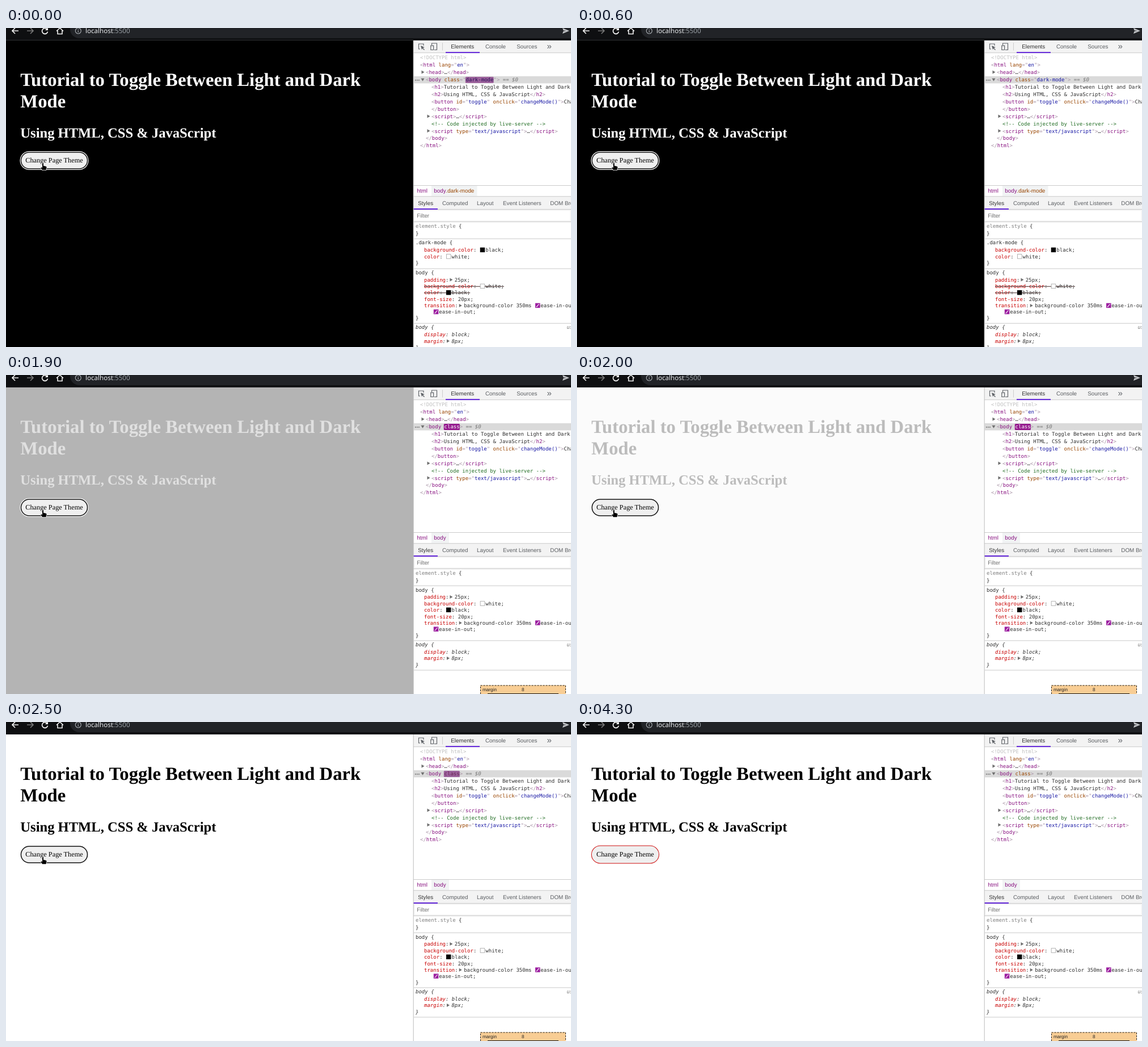
These frames come from a looping animation (996 by 562 pixels, 4400 ms). An HTML page with a canvas:

```html
<!DOCTYPE html>
<html lang="en">
<head>
<meta charset="utf-8">
<title>Theme toggle</title>
<style>
html, body { margin: 0; width: 100%; height: 100%; overflow: hidden; background: #fff; }
canvas { display: block; }
</style>
</head>
<body>
<canvas id="stage" width="996" height="562"></canvas>
<script>
const ctx = document.getElementById('stage').getContext('2d');
ctx.textRendering = 'geometricPrecision';
const LOOP = 4400, STEP = 100;
const SERIF = '"Liberation Serif", serif';
const SANS = '9.84px "Liberation Sans", sans-serif';
const MONO = '9.02px "DejaVu Sans Mono", monospace';
const CH = 9.02 * 0.602;
const TAG = '#881280', PUNCT = '#a894a6', ATTR = '#994500', VALUE = '#1a1aa6';
const INK = '#303030', PROP = '#c80000', ACCENT = '#5310d6', LINE = '#cacaca';

const clamp = v => Math.max(0, Math.min(1, v));
const mix = (a, b, k) => a.map((v, i) => Math.round(v + (b[i] - v) * k));
const rgb = c => `rgb(${c.join(',')})`;

// CSS ease-in-out: cubic-bezier(.42, 0, .58, 1)
function easeInOut(x) {
  x = clamp(x);
  let lo = 0, hi = 1, s = x;
  for (let i = 0; i < 24; i++) {
    s = (lo + hi) / 2;
    const bx = 3 * s * (1 - s) * (1 - s) * 0.42 + 3 * s * s * (1 - s) * 0.58 + s ** 3;
    if (bx < x) lo = s; else hi = s;
  }
  return 3 * s * s - 2 * s ** 3;
}

function rect(x, y, w, h, color) {
  ctx.fillStyle = color;
  ctx.fillRect(x, y, w, h);
}

function text(str, x, y, color, font = SANS) {
  ctx.font = font;
  ctx.fillStyle = color;
  ctx.fillText(str, x, y);
}

function pill(x, y, w, h, fill, r = h / 2) {
  ctx.beginPath();
  ctx.roundRect(x, y, w, h, r);
  ctx.fillStyle = fill;
  ctx.fill();
}

function path(d, color, width) {
  const p = new Path2D(d);
  if (width) {
    ctx.lineWidth = width;
    ctx.strokeStyle = color;
    ctx.stroke(p);
  } else {
    ctx.fillStyle = color;
    ctx.fill(p);
  }
}

const right = (x, y) => path(`M${x} ${y - 3}l5 3l-5 3z`, '#6e6e6e');
const down = (x, y) => path(`M${x} ${y - 2.5}h6l-3 5z`, '#6e6e6e');

// ---- browser bar ----
function toolbar() {
  rect(0, 0, 996, 22, '#0e0f11');
  rect(0, 21, 996, 1, '#2e2f32');
  pill(113, -14, 900, 32, '#212327');
  path('M22 5H11M16 0L11 5L16 10', '#f1f1f1', 1.7);
  path('M37 5H48M43 0L48 5L43 10', '#777', 1.7);
  path('M72.5 2.2A5 5 0 1 0 73.5 6.5', '#f1f1f1', 1.7);
  path('M74 -1V4H69z', '#f1f1f1');
  path('M89 5.5L95 0L101 5.5M91 4.5V10.5H99V4.5', '#f1f1f1', 1.6);
  path('M132.3 5a5 5 0 1 1 -10 0a5 5 0 1 1 10 0M127.3 4.4V7.8M127.3 2.2V3.4', '#a4a8ad', 1.2);
  const font = '11.6px "Noto Sans", sans-serif';
  text('localhost', 140, 9.3, '#e8eaed', font);
  text(':5500', 140 + ctx.measureText('localhost').width, 9.3, '#9aa0a6', font);
  path('M981 0L993 5L981 10L982.5 5.8L988 5L982.5 4.2z', '#c3c5c8');
}

// ---- page ----
function page(t) {
  const on = t >= 1800;
  const bg = on ? easeInOut((t - 1682) / 350) : 0;
  const fg = on ? easeInOut((t - 1680) / 900) : 0;
  const ink = t >= 2500 ? '#000' : rgb(mix([255, 255, 255], [0, 0, 0], fg));
  rect(0, 22, 718, 540, rgb(mix([0, 0, 0], [255, 255, 255], bg)));
  const h1 = 'bold 32.7px ' + SERIF;
  text('Tutorial to Toggle Between Light and Dark', 25.3, 102, ink, h1);
  text('Mode', 25.3, 140, ink, h1);
  text('Using HTML, CSS & JavaScript', 25.3, 192.7, ink, 'bold 24.6px ' + SERIF);
  button(t >= 4300);
}

function button(blurred) {
  if (blurred) {
    pill(25, 217.5, 120, 32, '#cf1111');
    pill(26, 218.5, 118, 30, '#efefef');
  } else {
    pill(24.5, 217, 121, 33, '#fff');
    pill(25.7, 218.2, 118.6, 30.6, '#101010');
    pill(27.2, 219.7, 115.6, 27.6, '#efefef');
  }
  text('Change Page Theme', 34.2, 237.3, '#000', '12.3px ' + SERIF);
}

// ---- elements panel ----
function markup(str, x, y) {
  let inTag = false, quoted = false, named = false;
  for (const c of str) {
    let color = INK;
    if (c === '<') { inTag = true; named = false; color = PUNCT; }
    else if (c === '>') { inTag = false; color = PUNCT; }
    else if (c === '"' && inTag) { quoted = !quoted; color = PUNCT; }
    else if (quoted) color = VALUE;
    else if (inTag) {
      if (c === ' ') named = true;
      color = c === '/' || c === '=' ? PUNCT : named ? ATTR : TAG;
    }
    text(c, x, y, color, MONO);
    x += CH;
  }
  return x;
}

// Flash on the changed attribute: colour shift and opacity.
function flash(t) {
  if (t < 600) return { k: 1, a: t < 300 ? 1 : clamp((600 - t) / 400) };
  if (t < 1800) return { k: 1, a: 0 };
  return { k: clamp((t - 2000) / 500), a: t < 3000 ? 1 : clamp((3300 - t) / 400) };
}

function bodyRow(y, dark, t) {
  rect(719, 85, 277, 12.5, '#dadada');
  for (let i = 0; i < 3; i++) rect(721 + i * 3, 91, 1.7, 1.7, '#6e6e6e');
  down(731.5, 91.3);
  const end = markup(dark ? '<body class="dark-mode">' : '<body class>', 740, y);
  text(' == $0', end, y, '#777', 'italic ' + MONO);
  const { k, a } = flash(t);
  if (!a) return;
  const word = dark ? 'dark-mode' : 'class';
  const x = 740 + CH * (dark ? 13 : 6);
  ctx.globalAlpha = a;
  pill(x - 0.8, 86, word.length * CH + 1, 11, rgb(mix([149, 26, 142], [156, 98, 156], k)), 1.5);
  ctx.globalAlpha = 1;
  const mid = dark ? [44, 17, 88] : [104, 40, 84];
  const base = dark ? [26, 26, 166] : [153, 69, 0];
  text(word, x, y, rgb(mix(mix([255, 255, 255], mid, k), base, 1 - a)), MONO);
}

function tree(dark, t) {
  const row = i => 55 + i * 12.95;
  text('<!DOCTYPE html>', 730, row(0), '#c0c0c0', MONO);
  bodyRow(row(3), dark, t);
  const rows = [
    [1, 730, '<html lang="en">'],
    [2, 740, '<head>…</head>'],
    [4, 750, '<h1>Tutorial to Toggle Between Light and Dark Mode</h1>'],
    [5, 750, '<h2>Using HTML, CSS & JavaScript</h2>'],
    [6, 750, '<button id="toggle" onclick="changeMode()">Change'],
    [7, 750, '</button>'],
    [8, 750, '<script>…<\/script>'],
    [10, 750, '<script type="text/javascript">…<\/script>'],
    [11, 740, '</body>'],
    [12, 730, '</html>']
  ];
  for (const [i, x, str] of rows) {
    markup(str, x, row(i));
    if (str.includes('…')) right(x - 7.5, row(i) - 3.2);
  }
  text('<!-- Code injected by live-server -->', 750, row(9), '#236e25', MONO);
}

function tabs(list, y) {
  list.forEach(([name, x], i) => text(name, x, y, i ? '#5a5d61' : '#333', SANS));
}

function chrome(dark) {
  rect(718, 22, 278, 540, '#fff');
  rect(718, 22, 278, 21.5, '#f3f3f3');
  rect(718, 43.2, 278, 1, LINE);
  path('M736 31V28H727.5V37H730', '#5f6368', 1.2);
  path('M731 31L738 34L735 35L738 38L737 39L734 36L733 38.5z', '#5f6368');
  path('M750.5 30V27H759.5V38.5H755M748.8 31.2H753.6V38.5H748.8z', '#5f6368', 1.2);
  rect(769, 26, 1, 13.5, '#ccc');
  tabs([['Elements', 784.3], ['Console', 845], ['Sources', 900.3]], 36.3);
  text('»', 953.5, 37, '#5f6368', '15px "Liberation Sans", sans-serif');
  rect(775, 42.3, 60, 1.8, ACCENT);

  rect(718, 277, 278, 1, LINE);
  text('html', 724.3, 290.3, TAG);
  rect(750, 278, dark ? 80.5 : 31, 18, '#f1f3f4');
  text('body', 754.3, 290.3, TAG);
  if (dark) text('.dark-mode', 754.3 + ctx.measureText('body').width, 290.3, ATTR);

  rect(718, 296.3, 278, 45, '#f3f3f3');
  rect(718, 296.3, 278, 1, LINE);
  tabs([['Styles', 726.3], ['Computed', 769], ['Layout', 830], ['Event Listeners', 876],
    ['DOM Breakpoints', 959.3]], 311.8);
  rect(718, 319, 278, 1, LINE);
  rect(718, 318, 43, 1.8, ACCENT);
  rect(720.5, 322, 274, 17, '#fff');
  text('Filter', 724.3, 333.7, '#6f6f6f');
  rect(718, 341, 278, 1, LINE);
}

// ---- styles panel ----
const mono = (str, x, y, color = INK, style = '') => text(str, x, y, color, style + MONO);
const divider = y => rect(719, y, 277, 1, LINE);

function prop(name, y, style = '') {
  mono(name, 737, y, PROP, style);
  mono(':', 737 + name.length * CH, y, INK, style);
  return 737 + (name.length + 1) * CH;
}

function expandable(name, value, y, style) {
  const x = prop(name, y, style);
  right(x + 2, y - 3.2);
  mono(value, x + 10.4, y, INK, style);
}

function swatch(name, value, y, struck) {
  const x = prop(name, y) + CH;
  mono(value + ';', x + 10.6, y);
  if (struck) rect(737, y - 3.3, x + 10.6 + (value.length + 1) * CH - 737, 1, '#46302f');
  rect(x + 1, y - 7.5, 8.4, 8.4, value === 'white' ? '#a0a0a0' : '#000');
  rect(x + 1.8, y - 6.7, 6.8, 6.8, value);
}

function curve(x, y) {
  rect(x, y - 7.5, 8.6, 8.4, '#9c1fa0');
  path(`M${x + 1.5} ${y - 0.8}C${x + 5} ${y - 0.8} ${x + 3.5} ${y - 5.5} ${x + 7.2} ${y - 5.5}`, '#fff', 1.1);
}

function bodyRule(y, struck) {
  mono('body {', 722, y);
  expandable('padding', '25px;', y + 12.8);
  swatch('background-color', 'white', y + 24.3, struck);
  swatch('color', 'black', y + 35.6, struck);
  prop('font-size', y + 47);
  mono('20px;', 737 + 11 * CH, y + 47);
  expandable('transition', 'background-color 350ms', y + 58.4);
  curve(933, y + 58.4);
  mono('ease-in-out, color', 942.3, y + 58.4);
  curve(753.8, y + 69.5);
  mono('ease-in-out;', 763.3, y + 69.5);
  mono('}', 722, y + 80.4);
  divider(y + 86);
}

function agentRule(y) {
  mono('body {', 722, y, INK, 'italic ');
  mono('user agent stylesheet', 988.5, y, '#777', 'italic ');
  const x = prop('display', y + 12.9, 'italic ');
  mono('block;', x + CH, y + 12.9, INK, 'italic ');
  expandable('margin', '8px;', y + 24.3, 'italic ');
  mono('}', 722, y + 35.6, INK, 'italic ');
  divider(y + 41.5);
}

function boxModel() {
  rect(836, 546.5, 151, 16, '#f8cd94');
  ctx.setLineDash([3, 2]);
  path('M836.5 562V547H986.5V562', '#222', 1);
  ctx.setLineDash([]);
  const font = '8.2px "Liberation Sans", sans-serif';
  text('margin', 840, 557, '#222', font);
  text('8', 909, 557, '#222', font);
  rect(849, 561, 125, 1, '#111');
}

function styles(dark) {
  mono('element.style', 722, 352, '#808080');
  mono('{', 722 + 14 * CH, 352);
  mono('}', 722, 365);
  divider(370.8);
  if (dark) {
    mono('.dark-mode {', 722, 381.3);
    swatch('background-color', 'black', 394.2);
    swatch('color', 'white', 405.7);
    mono('}', 722, 417);
    divider(423.5);
    bodyRule(433.8, true);
    agentRule(530.4);
  } else {
    bodyRule(381.5, false);
    agentRule(478);
    boxModel();
  }
}

// ---- pointer ----
const HAND = 'M-1 0Q0 -1.6 1 0V4.5L5.5 5.5Q7 6 6.5 8L5.5 12H-1L-3.6 8.2Q-4 6.5 -1 7.6z';
const ARROW = 'M0 0V12L2.8 9.5L4.6 13.6L6.4 12.8L4.7 8.8H8.4z';

function pointer(t) {
  if (t >= 3500) return;
  const k = t < 3000 ? 0 : Math.pow((t - 2900) / 600, 1.4);
  const x = 65 - 54 * k, y = 238.3 - 250 * k;
  ctx.save();
  ctx.translate(x, y);
  const shape = y > 217 ? HAND : ARROW;
  path(shape, '#fff', 1.4);
  path(shape, '#000');
  ctx.restore();
}

function draw(t) {
  const dark = t < 1800;
  ctx.clearRect(0, 0, 996, 562);
  page(t);
  chrome(dark);
  tree(dark, t);
  styles(dark);
  rect(717.7, 22, 1, 540, '#bdbdbd');
  toolbar();
  pointer(t);
}

const start = performance.now();
function frame() {
  const t = (performance.now() - start) % LOOP;
  draw(Math.floor(t / STEP) * STEP);
  requestAnimationFrame(frame);
}
frame();
</script>
</body>
</html>
```
